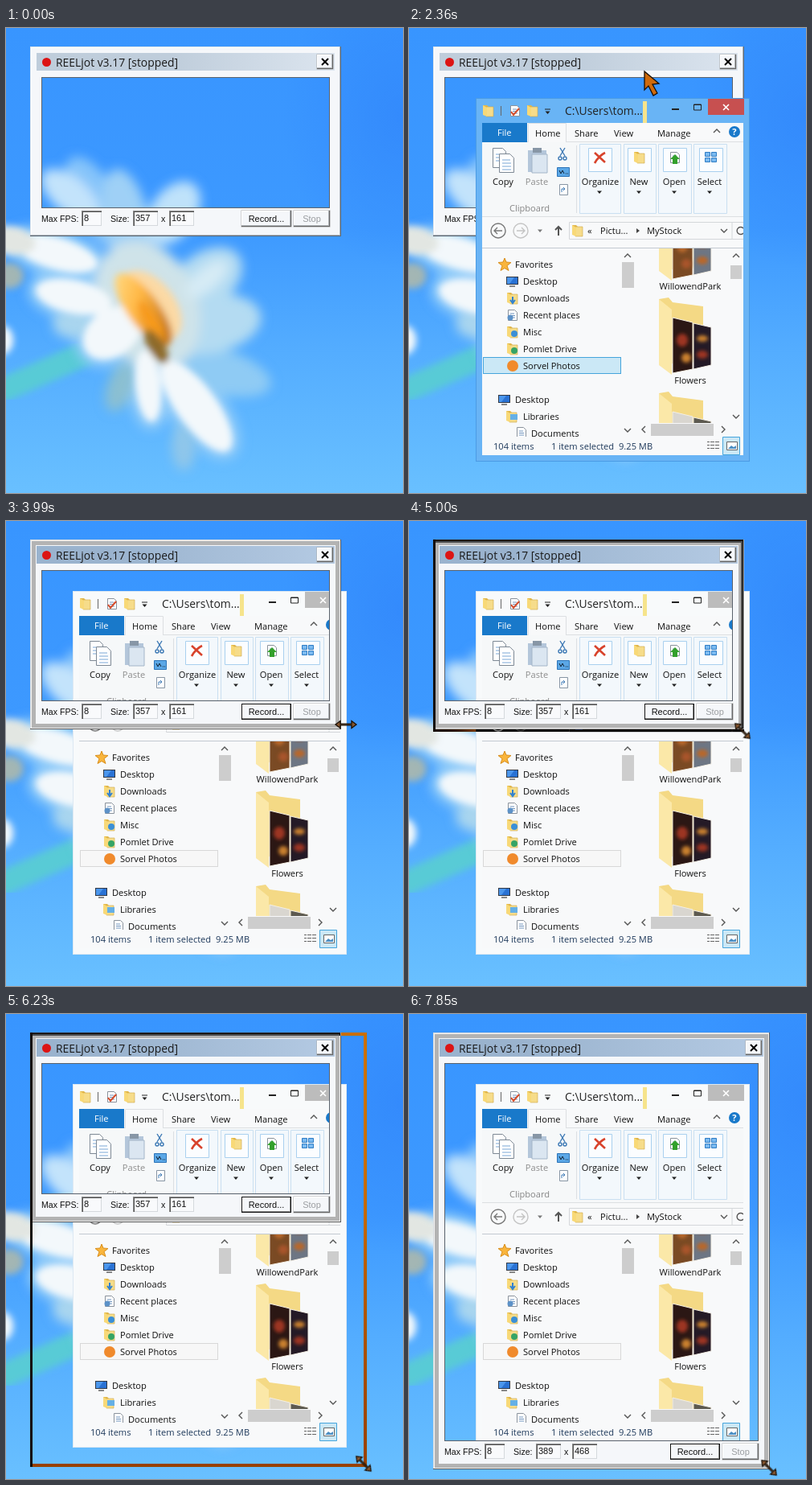
These frames come from a looping animation (494x578 px, 8000 ms). An HTML page:

```html
<!DOCTYPE html>
<html lang="en">
<head>
<meta charset="utf-8">
<title>Resizing a recorder window</title>
<style>
html, body { margin: 0; width: 100%; height: 100%; overflow: hidden; }
#stage { position: relative; width: 494px; height: 578px; overflow: hidden; isolation: isolate; background: #3d9aff; }
.layer { position: absolute; inset: 0; width: 494px; height: 578px; }
.low, #files, #rec, #rec *, #drag, .pose, .cue { animation: none 8s step-end infinite; }
text { font: 11.1px "Open Sans", "Noto Sans", sans-serif; fill: #111; }
text.c { text-anchor: middle; }
text.title { font-size: 13.9px; fill: #222; }
.line { fill: none; stroke: #555; stroke-width: 1.4; }

/* wallpaper */
.low { animation-name: leave; }
@keyframes leave { 6.25%, 100% { opacity: 0; } }

/* file window */
#files { z-index: 2; opacity: 0; transform-origin: 254px 313px; animation-name: open; }
@keyframes open {
  6.25% { opacity: .6; transform: scale(.97); }
  8.125%, 100% { opacity: 1; transform: none; }
}
#files .frame { fill: #69b4f5; stroke: #4b9be4; animation-name: fadeFrame; }
#files .shut { fill: #c75050; animation-name: fadeShut; }
#files .pick { fill: #cbe8f6; stroke: #45a5dc; animation-name: fadePick; }
#files .twist { fill: #a2a2a2; opacity: 0; animation-name: twist; animation-timing-function: linear; }
@keyframes fadeFrame { 34.375%, 100% { fill: #f8fafb; stroke: #dce8f2; } }
@keyframes fadeShut { 34.375%, 100% { fill: #bcbcbc; } }
@keyframes fadePick { 34.375%, 100% { fill: #f7f7f7; stroke: #d8d8d8; } }
@keyframes twist { 0%, 22.75% { opacity: 0; } 26%, 34.375% { opacity: 1; } 44%, 100% { opacity: 0; } }

/* recorder window */
#rec { position: absolute; z-index: 1; left: 30px; top: 23px; width: 387px; height: 236px; overflow: hidden;
  font: 10.6px/18px "Liberation Sans", Arial, sans-serif; color: #111; animation-name: raise, grow; }
#rec > * { position: absolute; box-sizing: border-box; white-space: nowrap; }
@keyframes raise { 34.375%, 100% { z-index: 3; } }
@keyframes grow { 90%, 100% { width: 419px; height: 543px; } }
#rec .hole { inset: 38px 14px 35px 14px; border: 1px solid #5a626c; box-shadow: 0 0 0 600px #f5f7fa; }
#rec .ring { inset: 0; animation-name: ring;
  box-shadow: inset -1px -1px #5d6872, inset -2px -2px #a9b0b8, inset 1px 1px #dde3ea, inset 2px 2px #fff; }
@keyframes ring {
  34.375%, 100% { box-shadow: inset -1px -1px #5a5a5a, inset 1px 1px #d5d9dd, inset 0 0 0 2px #f2f2f2, inset 0 0 0 7px #b3b3b3; }
}
#rec .bar { left: 8px; right: 8px; top: 8px; height: 22px; background: linear-gradient(90deg, #bfcddb 45%, #dce5ef); animation-name: bar; }
@keyframes bar { 34.375%, 100% { background: linear-gradient(90deg, #9ab3ce 25%, #b4cae3); } }
#rec .dot { left: 15px; top: 14px; width: 11px; height: 11px; border-radius: 50%; background: #dc1414; }
#rec .name { left: 32px; top: 9px; font: 13.9px/21px "Open Sans", "Noto Sans", sans-serif; color: #1a1a1a; }
#rec .exit { right: 10px; top: 10px; width: 20px; height: 18px; }
#rec .btn { background: #f5f7fa; text-align: center; box-shadow: inset -1px -1px #666, inset -2px -2px #b0b4b8, inset 1px 1px #fff, 0 0 0 .5px #aaa; }
#rec .go { right: 62px; bottom: 12px; width: 62px; height: 20px; line-height: 20px; font-size: 11px; animation-name: focus; }
@keyframes focus { 34.375%, 100% { box-shadow: inset 0 0 0 1px #111, inset -2px -2px #888, inset 2px 2px #fff; } }
#rec .stop { right: 14px; bottom: 12px; width: 45px; height: 20px; line-height: 20px; color: #9a9da0; font-size: 11px; }
#rec .t { bottom: 13px; }
#rec .box { bottom: 13px; height: 19px; padding-left: 3px; font-size: 11px; background: #f9fafc;
  box-shadow: inset 1px 1px #888, inset 2px 2px #555, inset -1px -1px #d5d9dd; }
#rec .old { animation-name: off; }
#rec .new { position: absolute; left: 3px; visibility: hidden; animation-name: on; }
@keyframes off { 90%, 100% { visibility: hidden; } }
@keyframes on { 90%, 100% { visibility: visible; } }

/* inverted resize outline */
#drag { position: absolute; left: 30px; top: 23px; visibility: hidden; animation-name: drag; }
#drag::before, #drag::after { content: ""; position: absolute; z-index: 5; inset: 0; }
#drag::before { border: 4px solid #fff; border-left: 0; mix-blend-mode: difference; }
#drag::after { border-left: 3px solid #150d06; }
@keyframes drag {
  62.5% { visibility: visible; width: 387px; height: 239px; }
  64.25% { visibility: visible; width: 389px; height: 267px; }
  66% { visibility: visible; width: 393px; height: 318px; }
  67.75% { visibility: visible; width: 399px; height: 400px; }
  69.625% { visibility: visible; width: 406px; height: 477px; }
  71.125% { visibility: visible; width: 411px; height: 513px; }
  72.875% { visibility: visible; width: 416px; height: 534px; }
  74.5% { visibility: visible; width: 419px; height: 542px; }
  76.375% { visibility: visible; width: 419px; height: 540px; }
  83% { visibility: visible; width: 419px; height: 541px; }
  86.875% { visibility: visible; width: 419px; height: 543px; }
  90%, 100% { visibility: hidden; width: 419px; height: 543px; }
}

/* pointers */
#pointers { z-index: 6; }
.pose { stroke: #1a1008; stroke-width: 1.3; opacity: 0; }
.arrow { fill: #cf6a0c; animation-name: arrow; }
.sizer { fill: #86562f; animation-name: sizer; }
@keyframes arrow {
  19.375% { opacity: 1; transform: translate(2px, 420px); }
  21.25% { opacity: 1; transform: translate(45px, 410px); }
  22.75% { opacity: 1; transform: translate(110px, 385px); }
  24.25% { opacity: 1; transform: translate(165px, 330px); }
  25.75% { opacity: 1; transform: translate(210px, 260px); }
  27.625% { opacity: 1; transform: translate(255px, 150px); }
  29.5% { opacity: 1; transform: translate(293px, 54px); }
  31.375% { opacity: 1; transform: translate(306px, 43px); }
  37.5% { opacity: 1; transform: translate(308px, 46px); }
  41% { opacity: 1; transform: translate(312px, 58px); }
  43% { opacity: 1; transform: translate(316px, 74px); }
  44.875% { opacity: 1; transform: translate(319px, 88px); }
  46.375% { opacity: 1; transform: translate(424px, 252px); }
  49.875%, 100% { opacity: 0; }
}
@keyframes sizer {
  49.875% { opacity: 1; transform: translate(423px, 253px); }
  51.375% { opacity: 1; transform: translate(421px, 254px); }
  52.875% { opacity: 1; transform: translate(419px, 255px); }
  54.375% { opacity: 1; transform: translate(417px, 256px) rotate(45deg); }
  55.875% { opacity: 1; transform: translate(414px, 256px) rotate(45deg); }
  62.5% { opacity: 1; transform: translate(415px, 261px) rotate(45deg); }
  64.25% { opacity: 1; transform: translate(417px, 296px) rotate(45deg); }
  66% { opacity: 1; transform: translate(421px, 350px) rotate(45deg); }
  67.75% { opacity: 1; transform: translate(427px, 430px) rotate(45deg); }
  69.625% { opacity: 1; transform: translate(433px, 508px) rotate(45deg); }
  71.125% { opacity: 1; transform: translate(439px, 538px) rotate(45deg); }
  72.875% { opacity: 1; transform: translate(444px, 555px) rotate(45deg); }
  74.5% { opacity: 1; transform: translate(447px, 562px) rotate(45deg); }
  76.375% { opacity: 1; transform: translate(445px, 559px) rotate(45deg); }
  83% { opacity: 1; transform: translate(445px, 560px) rotate(45deg); }
  86.875% { opacity: 1; transform: translate(445px, 562px) rotate(45deg); }
  98.125%, 100% { opacity: 1; transform: translate(448px, 564px) rotate(45deg); }
}
</style>
</head>
<body>
<div id="stage">
<svg class="layer" viewBox="0 0 494 578">
  <defs>
    <linearGradient id="sky" x2="0" y2="1">
      <stop stop-color="#3895ff"/><stop offset=".43" stop-color="#3d99ff"/>
      <stop offset=".7" stop-color="#54adff"/><stop offset="1" stop-color="#69c0ff"/>
    </linearGradient>
    <radialGradient id="shade">
      <stop stop-color="#2f82fa" stop-opacity=".6"/><stop offset="1" stop-color="#2f82fa" stop-opacity="0"/>
    </radialGradient>
    <linearGradient id="heart" x2=".3" y2="1">
      <stop stop-color="#ffe08f"/><stop offset=".5" stop-color="#ffb744"/><stop offset="1" stop-color="#c87a1c"/>
    </linearGradient>
    <filter id="soft" x="-40%" y="-40%" width="180%" height="180%"><feGaussianBlur stdDeviation="7"/></filter>
    <filter id="crisp" x="-20%" y="-20%" width="140%" height="140%"><feGaussianBlur stdDeviation="4"/></filter>
    <g id="petals">
      <ellipse cx="62" cy="280" rx="54" ry="20" transform="rotate(16 62 280)"/>
      <ellipse cx="84" cy="334" rx="48" ry="21" transform="rotate(12 84 334)"/>
      <ellipse cx="132" cy="379" rx="40" ry="29" transform="rotate(-36 132 379)"/>
      <ellipse cx="177" cy="445" rx="16" ry="45" transform="rotate(-6 177 445)"/>
      <ellipse cx="237" cy="470" rx="25" ry="68" transform="rotate(-36 237 470)"/>
    </g>
  </defs>
  <rect width="494" height="578" fill="url(#sky)"/>
  <ellipse cx="494" cy="110" rx="150" ry="190" fill="url(#shade)"/>
  <path d="M-9 452L105 402" stroke="#59cbd6" stroke-width="30" filter="url(#crisp)"/>
  <g filter="url(#soft)" fill="#b4dbf2">
    <use href="#petals" fill="#a5d6f8" stroke="#8fcbf9" stroke-width="20"/>
    <ellipse cx="112" cy="218" rx="28" ry="64" transform="rotate(-28 112 218)" fill="#86c4fa"/>
    <ellipse cx="80" cy="208" rx="22" ry="44" transform="rotate(-50 80 208)" fill="#c3e3fb"/>
    <ellipse cx="150" cy="240" rx="28" ry="66" transform="rotate(-12 150 240)" fill="#9fd0f6"/>
    <ellipse cx="208" cy="230" rx="28" ry="44" transform="rotate(35 208 230)" fill="#bfe2fa"/>
    <ellipse cx="260" cy="425" rx="72" ry="28" transform="rotate(16 260 425)" fill="#8fcbf4"/>
    <ellipse cx="248" cy="314" rx="34" ry="52" transform="rotate(52 248 314)"/>
    <ellipse cx="254" cy="368" rx="64" ry="36" transform="rotate(-10 254 368)"/>
    <ellipse cx="142" cy="446" rx="16" ry="32" transform="rotate(20 142 446)" fill="#8bbfd2"/>
    <ellipse cx="84" cy="368" rx="26" ry="18" fill="#a9d5ef"/>
    <ellipse cx="176" cy="345" rx="62" ry="84" transform="rotate(-24 176 345)" fill="#cfe3e9"/>
    <ellipse cx="250" cy="312" rx="14" ry="32" transform="rotate(50 250 312)" fill="#d6ebf5"/>
  </g>
  <ellipse class="low" cx="221" cy="520" rx="15" ry="30" fill="#8fc6ea" filter="url(#soft)"/>
  <g filter="url(#crisp)" fill="#f3f8fb">
    <use href="#petals"/>
    <ellipse cx="5" cy="264" rx="32" ry="18" transform="rotate(10 5 264)" fill="#e2e6e2"/>
    <ellipse cx="4" cy="308" rx="18" ry="16" fill="#a3b6b4"/>
    <ellipse cx="-5" cy="388" rx="14" ry="18"/>
    <ellipse cx="180" cy="345" rx="30" ry="50" transform="rotate(-38 180 345)" fill="#fbd9a4"/>
    <ellipse cx="171" cy="350" rx="20" ry="54" transform="rotate(-36 171 350)" fill="url(#heart)"/>
    <ellipse cx="180" cy="364" rx="8" ry="28" transform="rotate(-30 180 364)" fill="#f79a1c"/>
    <ellipse cx="187" cy="396" rx="10" ry="24" transform="rotate(-32 187 396)" fill="#8d6a2c"/>
  </g>
</svg>

<svg id="files" class="layer" viewBox="0 0 494 578">
  <defs>
    <g id="fold"><path d="M0 1h5l2 2v10H0z" fill="#e3b84a"/><path d="M4 3h9v12H4z" fill="#f6dc8a" stroke="#cfa544" stroke-width=".6"/><path d="M0 1l5 3v11l-5-2z" fill="#f8d978"/></g>
    <g id="screen"><path d="M0 0h15v10H0z" fill="#333a46"/><path d="M1 1h13v8H1z" fill="#2a72d4"/><path d="M1 1h9L4 9H1z" fill="#4b96ec"/><path d="M4 11h7v2H4z" fill="#888"/></g>
    <g id="sheet" stroke="#8a929c"><path d="M.5.5h8l3 3v10H.5z" fill="#fff"/><path d="M3 5h5M3 7.500h6M3 10h6" stroke="#6f93bd"/></g>
    <filter id="blur"><feGaussianBlur stdDeviation="2"/></filter>
    <g id="bigfold">
      <path d="M311 337l12-2 5 6 38 5v69l-55 3z" fill="#f4d985"/>
      <path d="M328 360l25 6v58l-25 5z" fill="var(--a)" stroke="#f4efe4"/>
      <path d="M354 367l22 5v47l-22 5z" fill="var(--c)" stroke="#f4efe4"/>
      <g filter="url(#blur)">
        <ellipse cx="340" cy="388" rx="7" ry="8" fill="var(--b)"/><ellipse cx="345" cy="410" rx="6" ry="6" fill="var(--d)"/>
        <ellipse cx="365" cy="386" rx="7" ry="4" fill="var(--d)"/><ellipse cx="365" cy="406" rx="7" ry="5" fill="var(--b)"/>
      </g>
      <path d="M311 337l16 13v81l-16-12z" fill="#fbe8a8"/>
    </g>
    <path id="up" class="line" d="M-4 2l4-4 4 4"/>
    <path id="drop" d="M-3-1.500h6l-3 3.500z" fill="#222"/>
    <path id="twig" class="twist cue" d="M3-3v6h-6z"/>
    <clipPath id="pane"><path d="M91 274h325v234H91z"/></clipPath>
    <clipPath id="list"><path d="M282 274h117v217H282z"/></clipPath>
    <clipPath id="inner"><path d="M91 118h325v413H91z"/></clipPath>
  </defs>
  <rect class="frame cue" x="83.500" y="87.500" width="340" height="451"/>
  <path d="M91 118h325v413H91z" fill="#f8f9fa"/>
  <path d="M291 91h5v27h-5z" fill="#f6e48c"/>
  <use href="#fold" x="92" y="95"/><use href="#fold" x="147" y="95"/>
  <path d="M114.500 97v12" stroke="#666"/>
  <use href="#sheet" x="126" y="96"/><path d="M127 104l3 4 7-8" fill="none" stroke="#d64b28" stroke-width="2"/>
  <path d="M169 101h7" stroke="#222"/><use href="#drop" x="172.500" y="105"/>
  <text class="title" x="194" y="108">C:\Users\tom...</text>
  <path class="shut cue" d="M372 88h45v20h-45z"/>
  <path d="M327 101h9" stroke="#222" stroke-width="2"/><path d="M354.500 95h9v7h-9zM354 95.500h10" fill="none" stroke="#222"/>
  <path d="M391 95l7 7m0-7l-7 7" stroke="#fff" stroke-width="1.600"/>

  <path d="M91 142h325v92H91z" fill="#f6f8f9"/>
  <path d="M91 141.500h325M91 234.500h325M208.500 146v84" stroke="#dcdfe2"/>
  <path d="M91 118h56v24H91z" fill="#1979ca"/>
  <path d="M148.500 142v-23.500h47V142" fill="#f8f9fa" stroke="#dcdfe2"/>
  <text x="110" y="134" style="fill:#fff">File</text>
  <text x="157" y="135">Home</text><text x="206" y="135">Share</text><text x="255" y="135">View</text><text x="309" y="135">Manage</text>
  <use href="#up" x="383" y="128"/>
  <circle cx="405" cy="129" r="7" fill="#1979ca"/><text class="c" x="405" y="133" style="fill:#fff;font-weight:700">?</text>

  <g fill="#fff" stroke="#7d8894"><path d="M104.500 149.500h12l4 4v20h-16z"/><path d="M112.500 156.500h13l5 5v18h-18z"/></g>
  <path d="M108 157h4m-4 4h4m-4 4h4m4-1h10m-10 4h11m-11 4h11m-11 4h11" stroke="#7ba7d6"/>
  <path d="M148 152h23v27h-23z" fill="#b4c6da"/><path d="M154 149h11v6h-11z" fill="#8796a6"/><path d="M153 157h19v23h-19z" fill="#dbe6f1" stroke="#a3b5c8"/>
  <g fill="none" stroke="#3c78b4" stroke-width="1.400"><path d="M188 149l6 10m0-10l-6 10"/><circle cx="188" cy="162" r="2"/><circle cx="194" cy="162" r="2"/></g>
  <path d="M184.500 173.500h15v11h-15z" fill="#5ba7e6" stroke="#2d74b8"/><path d="M187 177l2 4 2-4 2 4m2 0h1m1 0h1" fill="none" stroke="#123"/>
  <path d="M187.500 194.500h10v13h-10z" fill="#fff" stroke="#8795a4"/><path d="M190 204v-4h4m-2-2l2 2-2 2" fill="none" stroke="#3c78b4"/>
  <text class="c" x="117" y="195">Copy</text><text class="c" x="159" y="195" style="fill:#8d8d8d">Paste</text>
  <text class="c" x="150" y="228" style="fill:#868686">Clipboard</text>
  <g fill="#f3f8fc" stroke="#c9dff1">
    <path d="M212.500 144.500h51v86h-51zM267.500 144.500h40v86h-40zM310.500 144.500h41v86h-41zM354.500 144.500h41v86h-41z"/>
    <path d="M223.500 149.500h29v29h-29zM272.500 149.500h29v29h-29zM316.500 149.500h29v29h-29zM361.500 149.500h29v29h-29z" fill="#fbfdff" stroke="#a9d0ef"/>
  </g>
  <path d="M231 155l13 12m0-12q-8 4-13 13" fill="none" stroke="#d8432c" stroke-width="2.600"/>
  <use href="#fold" x="280" y="153"/>
  <use href="#sheet" x="325" y="154"/><path d="M328 169v-6h-3l6-6 6 6h-3v6z" fill="#33a02c"/>
  <path d="M368.500 154.500h6v5h-6zm8 0h6v5h-6zm-8 7h6v5h-6zm8 0h6v5h-6z" fill="#7bbaf0" stroke="#2f7cc4"/>
  <text class="c" x="238" y="195">Organize</text><text class="c" x="286" y="195">New</text><text class="c" x="330" y="195">Open</text><text class="c" x="374" y="195">Select</text>
  <use href="#drop" x="237" y="204"/><use href="#drop" x="286" y="204"/><use href="#drop" x="330" y="204"/><use href="#drop" x="374" y="204"/>

  <g class="line" clip-path="url(#inner)">
    <g stroke="#777"><circle cx="111" cy="252" r="9"/><path d="M116 252h-10m4-4l-4 4 4 4"/></g>
    <g stroke="#c4c4c4"><circle cx="139" cy="252" r="9"/><path d="M134 252h10m-4-4l4 4-4 4"/></g>
    <path d="M186 258v-11m-4 4l4-4 4 4" stroke-width="2"/>
    <path d="M199.500 241.500H402v21H199.500zM402 241.500h20v21h-20" stroke="#d4d7da" stroke-width="1"/>
    <path d="M416 249a4.500 4.500 0 1 0 0 6M388 250l4 4 4-4"/>
  </g>
  <use href="#drop" x="163" y="252" opacity=".6"/><use href="#fold" x="203" y="244"/>
  <text x="222" y="256">«</text><text x="238" y="256">Pictu...</text><path d="M283 249l4 3-4 3z" fill="#444"/><text x="296" y="256">MyStock</text>
  <path d="M91 273.500h325" stroke="#c3cad1"/>

  <g clip-path="url(#pane)">
    <rect class="pick cue" x="92.500" y="409.500" width="171" height="20"/>
    <use href="#twig" x="104" y="294"/><use href="#twig" x="104" y="462"/><use href="#twig" x="115" y="483"/><use href="#twig" x="126" y="504"/>
    <path d="M119 286l2 5 6 .5-5 4 2 6-5-3-5 3 2-6-5-4 6-.5z" fill="#f9b53c" stroke="#d98e1b"/>
    <use href="#screen" x="121" y="309"/><use href="#fold" x="122" y="328"/><path d="M129 334v6m-3-2l3 4 3-4" fill="none" stroke="#2f80d0" stroke-width="2"/>
    <use href="#sheet" x="123" y="350"/><circle cx="126" cy="360" r="3.500" fill="#5d92c8"/>
    <use href="#fold" x="122" y="370"/><circle cx="131" cy="380" r="4" fill="#3a8fd6"/>
    <use href="#fold" x="122" y="391"/><circle cx="131" cy="401" r="4" fill="#35a465"/>
    <circle cx="129" cy="420" r="7" fill="#f08a2c"/>
    <use href="#screen" x="111" y="456"/><use href="#fold" x="121" y="475"/><path d="M126 480h9v7h-9z" fill="#65b0e6"/><use href="#sheet" x="134" y="496"/>
    <text x="132" y="298">Favorites</text><text x="142" y="319">Desktop</text><text x="142" y="340">Downloads</text>
    <text x="142" y="361">Recent places</text><text x="142" y="382">Misc</text><text x="142" y="403">Pomlet Drive</text>
    <text x="142" y="424">Sorvel Photos</text><text x="132" y="466">Desktop</text><text x="142" y="487">Libraries</text><text x="152" y="508">Documents</text>
  </g>
  <g clip-path="url(#list)">
    <use href="#bigfold" y="-117" style="--a:#7a4a24;--b:#b8672c;--c:#6d7684;--d:#a8552a"/>
    <use href="#bigfold" style="--a:#2b1714;--b:#9c3420;--c:#241a26;--d:#c9802e"/>
    <use href="#bigfold" y="117" style="--a:#d9d6d0;--b:#8c8a80;--c:#5d5a50;--d:#b8b4ac"/>
    <text class="c" x="350" y="325">WillowendPark</text><text class="c" x="350" y="442">Flowers</text>
  </g>
  <path d="M265 291h15v32h-15zM400 295h14v17h-14zM301 492h78v15h-78z" fill="#cdcdcd"/>
  <use href="#up" x="272" y="283"/><use href="#up" x="407" y="283"/>
  <path class="line" d="M268 498l4 4 4-4M403 481l4 4 4-4M294 495l-4 4 4 4M389 495l4 4-4 4"/>

  <g style="--ink:#1e395b">
    <text x="105" y="524" style="fill:var(--ink)">104 items</text><text x="177" y="524" style="fill:var(--ink)">1 item selected</text><text x="261" y="524" style="fill:var(--ink)">9.25 MB</text>
  </g>
  <path d="M371 514.500h3m1 0h5m1 0h5M371 518.500h3m1 0h5m1 0h5M371 522.500h3m1 0h5m1 0h5" stroke="#666"/>
  <path d="M390.500 508.500h21v22h-21z" fill="#cbe8f6" stroke="#45a5dc"/><path d="M395.500 514.500h13v10h-13z" fill="#fff" stroke="#666"/><path d="M397 523l4-4 3 2 3-2v4z" fill="#4c8fc4"/>
</svg>

<div id="rec">
  <div class="hole"></div><div class="ring"></div><div class="bar"></div>
  <i class="dot"></i><span class="name">REELjot v3.17 [stopped]</span>
  <svg class="exit btn" viewBox="0 0 20 18"><path d="M6 5l8 8m0-8l-8 8" stroke="#000" stroke-width="2"/></svg>
  <span class="t" style="left:14px">Max FPS:</span><span class="box" style="left:64px;width:25px">8</span>
  <span class="t" style="left:100px">Size:</span>
  <span class="box" style="left:128px;width:31px"><span class="new">389</span><span class="old">357</span></span>
  <span class="t" style="left:163px">x</span>
  <span class="box" style="left:173px;width:31px"><span class="new">468</span><span class="old">161</span></span>
  <span class="btn go">Record...</span><span class="btn stop">Stop</span>
</div>

<div id="drag"></div>

<svg id="pointers" class="layer" viewBox="0 0 494 578">
  <path class="pose arrow" d="M0 0v23l5-5 6 12 5-3-6-11 8-1z"/>
  <path class="pose sizer" d="M-13 0l6-4.500v3.700H7v-3.700L13 0 7 4.500V.8H-7v3.700z"/>
</svg>
</div>
</body>
</html>
```
